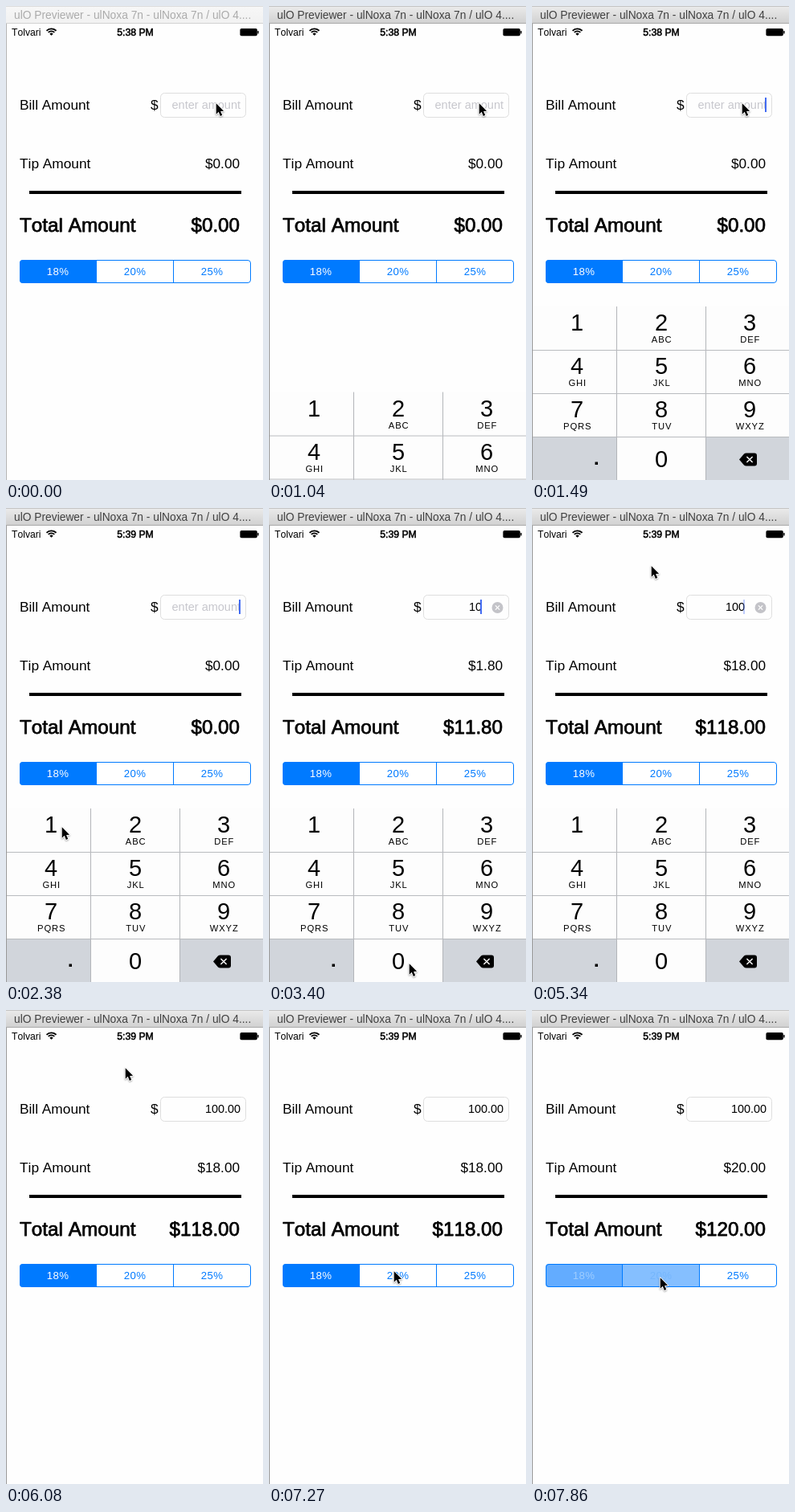
Write an HTML page with a canvas that moves like this. It is 320 px wide and 590 px high and loops after 8000 ms.

```html
<!DOCTYPE html>
<html lang="en">
<head>
<meta charset="utf-8">
<title>Tip calculator</title>
<style>
  html, body { margin: 0; width: 100%; height: 100%; overflow: hidden; background: #fff; }
  canvas { display: block; width: 320px; height: 590px; }
</style>
</head>
<body>
<canvas id="stage"></canvas>
<script>
const W = 320, H = 590, LOOP = 8000, STEP = 148.15;
const BLUE = '#007aff', GRAY_KEY = '#d1d5db';
const FONT = '"Liberation Sans", Arial, sans-serif';
const KB_TOP = 374, KB_H = 216;

const canvas = document.getElementById('stage');
const ctx = canvas.getContext('2d');
const dpr = window.devicePixelRatio || 1;
canvas.width = W * dpr;
canvas.height = H * dpr;

// Pointer stops: [step, x, y]
const POINTER = [
  [0, 262, 121], [10, 262, 121], [11, 250, 142], [12, 180, 260], [13, 100, 370],
  [15, 70, 397], [18, 70, 397], [19, 100, 455], [20, 160, 548], [21, 175, 567],
  [28, 175, 567], [29, 180, 557], [30, 176, 455], [31, 160, 240], [32, 151, 98],
  [33, 149, 72], [45, 149, 72], [46, 149, 84], [47, 151, 145], [48, 154, 245],
  [49, 156, 325], [50, 157, 344], [51, 160, 333], [54, 160, 333]
];

const KEYS = ['', 'ABC', 'DEF', 'GHI', 'JKL', 'MNO', 'PQRS', 'TUV', 'WXYZ'];
const COLS = [56, 161, 271];

function rect(x, y, w, h, color) {
  ctx.fillStyle = color;
  ctx.fillRect(x, y, w, h);
}

function roundRect(x, y, w, h, r) {
  ctx.beginPath();
  ctx.roundRect(x, y, w, h, r);
}

function path(points, close) {
  ctx.beginPath();
  points.forEach(([x, y], i) => i ? ctx.lineTo(x, y) : ctx.moveTo(x, y));
  if (close) ctx.closePath();
}

function cross(x, y, r, width) {
  ctx.strokeStyle = '#fff';
  ctx.lineWidth = width;
  for (const s of [1, -1]) {
    path([[x - r, y - r * s], [x + r, y + r * s]]);
    ctx.stroke();
  }
}

function text(str, x, y, size, { align = 'left', color = '#000', heavy = 0, spacing = 0 } = {}) {
  ctx.font = `${size}px ${FONT}`;
  ctx.fontKerning = 'none';
  ctx.textAlign = align;
  ctx.letterSpacing = spacing + 'px';
  ctx.fillStyle = color;
  ctx.fillText(str, x, y);
  if (heavy) {
    ctx.strokeStyle = color;
    ctx.lineWidth = heavy;
    ctx.lineJoin = 'round';
    ctx.strokeText(str, x, y);
  }
}

function pointerAt(n) {
  const i = Math.max(1, POINTER.findIndex(p => p[0] >= n));
  const [n0, x0, y0] = POINTER[i - 1], [n1, x1, y1] = POINTER[i];
  const k = (n - n0) / (n1 - n0);
  return [x0 + (x1 - x0) * k, y0 + (y1 - y0) * k];
}

function keyboardOffset(n) {
  const rest = s => s <= 0 ? 1 : (1 + 1.7 * s) * Math.exp(-1.7 * s);
  if (n < 10) return KB_H * rest(n - 6);
  if (n < 37) return 0;
  return n < 41 ? KB_H * (1 - rest(n - 36)) : KB_H;
}

function caretAlpha(n) {
  if (n < 7 || n > 36) return 0;
  if (n >= 17 && n < 26) return n === 20 || n === 22 ? 0.4 : n === 21 ? 0 : 1;
  const base = n < 17 ? 2 : 26;
  return [1, 1, 1, 0.35, 0, 0, 0.5][(n - base) % 7];
}

function bill(n) {
  return n < 17 ? 0 : n < 23 ? 1 : n < 25 ? 10 : 100;
}

function titleBar(active) {
  const g = ctx.createLinearGradient(0, 0, 0, 22);
  g.addColorStop(0, active ? '#ebebeb' : '#f7f7f7');
  g.addColorStop(1, active ? '#d0d0d0' : '#f1f1f1');
  rect(0, 0, W, 22, g);
  rect(0, 0, W, 1, active ? '#c4c4c4' : '#dcdcdc');
  rect(0, 21, W, 1, active ? '#a9a9a9' : '#d2d2d2');
  text('ulO Previewer - ulNoxa 7n - ulNoxa 7n / ulO 4....', 10, 15.5, 13.8,
    { color: active ? '#404040' : '#ababab' });
}

function statusBar(clock) {
  text('Tolvari', 7, 37, 12.2);
  ctx.strokeStyle = '#000';
  ctx.lineWidth = 1.8;
  for (const r of [5.2, 8.2]) {
    ctx.beginPath();
    ctx.arc(56.5, 36.5, r, -Math.PI * 0.76, -Math.PI * 0.24);
    ctx.stroke();
  }
  ctx.fillStyle = '#000';
  ctx.beginPath();
  ctx.moveTo(56.5, 36.8);
  ctx.arc(56.5, 36.8, 3, -Math.PI * 0.76, -Math.PI * 0.24);
  ctx.fill();
  text(clock, 161, 37, 12.2, { align: 'center', heavy: 0.55 });

  roundRect(291.4, 28, 21.4, 9.2, 1.8);
  ctx.fill();
  rect(313.2, 31, 1.4, 3.4, '#000');
}

function field(n, amount) {
  ctx.strokeStyle = '#dedede';
  ctx.lineWidth = 1;
  roundRect(192.5, 108.5, 106, 30, 5);
  ctx.stroke();
  if (!amount) {
    text('enter amount', 292, 128, 14.5, { align: 'right', color: '#c7c7cd' });
  } else if (n > 36) {
    text('100.00', 292, 128, 14.4, { align: 'right' });
  } else {
    text(String(amount), 265, 128, 14.4, { align: 'right' });
    ctx.fillStyle = '#c3c3c8';
    ctx.beginPath();
    ctx.arc(284.5, 124, 7, 0, Math.PI * 2);
    ctx.fill();
    cross(284.5, 124, 2.6, 1.3);
  }
  ctx.globalAlpha = caretAlpha(n);
  rect(amount ? 263 : 290, 114, 2, 18, '#426bf2');
  ctx.globalAlpha = 1;
}

function segments(n) {
  const fading = n >= 53, pressed = n === 52;
  const fills = [fading ? '#63acff' : BLUE, fading ? '#85bfff' : pressed ? '#d9ebff' : '#fff', '#fff'];
  const inks = [fading ? '#9fcdff' : '#fff', fading ? '#75b6fc' : BLUE, BLUE];
  ctx.save();
  roundRect(17, 316, 288, 29, 4);
  ctx.clip();
  fills.forEach((c, i) => rect(17 + 96 * i, 316, 96, 29, c));
  ctx.restore();
  ctx.strokeStyle = BLUE;
  ctx.lineWidth = 1;
  roundRect(17.5, 316.5, 287, 28, 3.5);
  ctx.stroke();
  rect(112, 316, 1, 29, BLUE);
  rect(208, 316, 1, 29, BLUE);
  ['18%', '20%', '25%'].forEach((s, i) =>
    text(s, 64.6 + 96 * i, 335, 13.2, { align: 'center', color: inks[i], spacing: 0.4 }));
}

function keyboard(offset, zeroDown) {
  if (offset >= KB_H) return;
  ctx.save();
  ctx.translate(0, offset);
  rect(1, KB_TOP, 319, KB_H, '#fdfdfd');
  rect(1, 536, 105, 54, GRAY_KEY);
  rect(216, 536, 104, 54, GRAY_KEY);
  if (zeroDown) rect(106, 536, 110, 54, GRAY_KEY);
  for (const x of [105, 216]) rect(x, KB_TOP, 1, KB_H, '#b3b5b9');
  for (const y of [428, 482, 536]) rect(1, y, 319, 1, '#b9bbbf');

  KEYS.forEach((letters, i) => {
    const x = COLS[i % 3], y = 404 + 54 * Math.floor(i / 3);
    text(String(i + 1), x, y, 29, { align: 'center' });
    text(letters, x + 0.7, y + 15, 11.2, { align: 'center', spacing: 0.9 });
  });
  text('0', 161, 574, 29, { align: 'center' });
  rect(78.5, 567.5, 3.5, 3.5, '#000');

  ctx.fillStyle = '#000';
  ctx.beginPath();
  ctx.moveTo(258, 564.5);
  ctx.lineTo(264, 557.6);
  ctx.quadraticCurveTo(265, 556.5, 267, 556.5);
  ctx.arcTo(280, 556.5, 280, 564, 3);
  ctx.arcTo(280, 572.5, 272, 572.5, 3);
  ctx.lineTo(267, 572.5);
  ctx.quadraticCurveTo(265, 572.5, 264, 571.4);
  ctx.closePath();
  ctx.fill();
  cross(271, 564.5, 3.6, 1.4);
  ctx.restore();
}

function pointer([x, y]) {
  ctx.save();
  ctx.translate(x - 0.3, y + 0.3);
  ctx.scale(0.94, 0.94);
  path([[0, 0], [0, 14.2], [3.2, 11.2], [5.5, 16.6], [8, 15.5], [5.7, 10.3], [10, 10.1]], true);
  ctx.shadowColor = 'rgba(0,0,0,.35)';
  ctx.shadowBlur = 2 * dpr;
  ctx.shadowOffsetY = dpr;
  ctx.lineJoin = 'round';
  ctx.lineWidth = 2;
  ctx.strokeStyle = '#fff';
  ctx.stroke();
  ctx.shadowColor = 'transparent';
  ctx.fillStyle = '#000';
  ctx.fill();
  ctx.restore();
}

function draw(time) {
  const n = Math.min(53, Math.floor(time / STEP + 0.05));
  const amount = bill(n);
  const tip = amount * (n >= 53 ? 0.2 : 0.18);
  const money = v => '$' + v.toFixed(2);

  ctx.setTransform(dpr, 0, 0, dpr, 0, 0);
  rect(0, 0, W, H, '#fefefe');
  titleBar(n >= 6);
  rect(0, 22, 1, 568, n >= 6 ? '#9a9a9a' : '#b4b4b4');
  statusBar(n < 12 ? '5:38 PM' : '5:39 PM');

  text('Bill Amount', 17, 129, 17.3);
  text('$', 180, 129, 17.3);
  field(n, amount);
  text('Tip Amount', 17, 202, 17.3);
  text(money(tip), 291, 202, 17.2, { align: 'right' });
  rect(29, 230, 264, 4, '#000');
  text('Total Amount', 17, 281, 24.3, { heavy: 0.75 });
  text(money(amount + tip), 291, 281, 24.2, { align: 'right', heavy: 0.75 });
  segments(n);
  keyboard(keyboardOffset(n), n === 22 || n === 24);
  pointer(pointerAt(n));
}

const start = performance.now();
function tick() {
  draw((performance.now() - start) % LOOP);
  requestAnimationFrame(tick);
}
tick();
</script>
</body>
</html>
```
